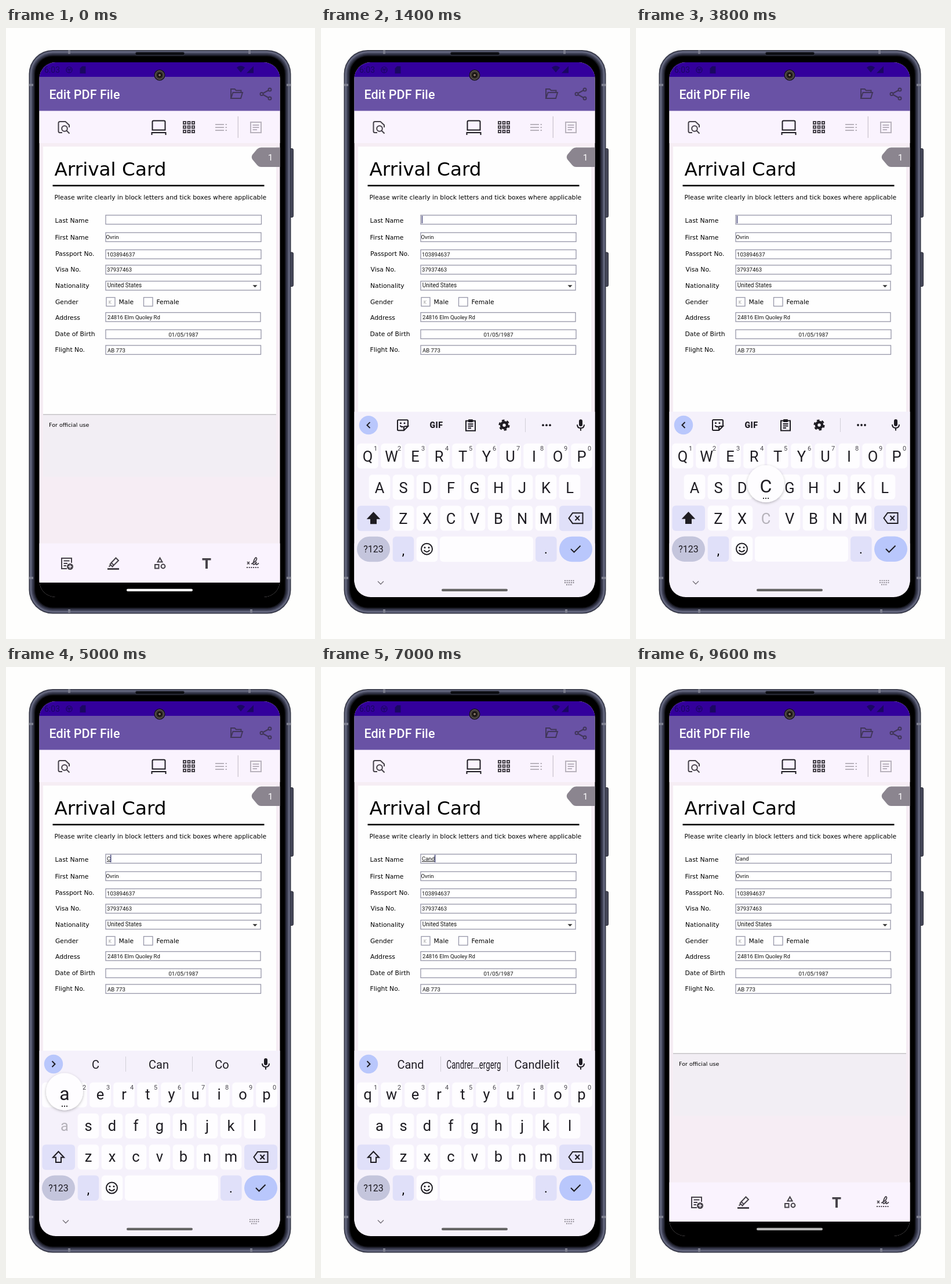
Write an HTML page that moves like this. It is 533 by 1051 pixels and loops after 9800 ms.

```html
<!DOCTYPE html>
<html lang="en">
<head>
<meta charset="utf-8">
<title>Edit PDF File</title>
<style>
  html, body { margin: 0; width: 100%; height: 100%; overflow: hidden; background: #fefefd; }
  svg { display: block; width: 533px; height: 1051px; }
  text { font-family: Roboto, sans-serif; white-space: pre; }
  .form { font-family: "DejaVu Sans", sans-serif; font-size: 10.8px; }
  .value { font-size: 9.6px; fill: #111; }
  .box { fill: #fff; stroke: #9696a8; stroke-width: 1.3; }
  .mid { text-anchor: middle; }
  .line { fill: none; stroke: currentColor; stroke-width: 2; }
</style>
</head>
<body>
<svg viewBox="0 0 533 1051">
  <defs>
    <clipPath id="screen"><rect x="57.5" y="59" width="415" height="920" rx="28"/></clipPath>
    <filter id="shadow" x="-30%" y="-30%" width="160%" height="160%">
      <feDropShadow dx="0" dy="1.5" stdDeviation="2" flood-opacity=".28"/>
    </filter>
  </defs>
  <g id="phone"></g>
  <g clip-path="url(#screen)">
    <g id="app"></g>
    <g id="entry">
      <text id="typed" class="value" y="333"></text>
      <rect id="caret" y="323" width="1.5" height="13" fill="#45477c"/>
    </g>
    <g id="keyboard"></g>
    <rect id="handle" x="208" y="964.8" width="114" height="4.2" rx="2.1"/>
  </g>
  <g id="camera">
    <circle cx="265" cy="81" r="9.5" fill="#17151a"/>
    <circle cx="265" cy="81" r="7.5" fill="#3d3733" stroke="#6d655f"/>
    <circle cx="265" cy="81" r="4.5" fill="#15110f"/>
    <circle cx="265" cy="81" r="2" fill="#806f64"/>
  </g>
</svg>
<script>
const LOOP = 9800, TICK = 200, CLOSE = 8600;
const INK = '#1e1c22';
const $ = id => document.getElementById(id);

const rect = (x, y, w, h, fill, rx = 0, extra = '') =>
  `<rect x="${x}" y="${y}" width="${w}" height="${h}" rx="${rx}" fill="${fill}" ${extra}/>`;
const text = (x, y, size, str, extra = '') =>
  `<text x="${x}" y="${y}" font-size="${size}" ${extra}>${str}</text>`;
const label = (x, y, str) => `<text class="form" x="${x}" y="${y}">${str}</text>`;
const value = (x, y, str, extra = '') => `<text class="value" x="${x}" y="${y}" ${extra}>${str}</text>`;
const box = (x, y, w, h) => `<rect class="box" x="${x}" y="${y}" width="${w}" height="${h}"/>`;
const path = (d, extra = 'class="line"') => `<path d="${d}" ${extra}/>`;
const solid = d => path(d, 'fill="currentColor"');
// Icons are drawn on a 24 unit grid centred on x, y.
const icon = (x, y, color, body, scale = 1) =>
  `<g transform="translate(${x} ${y}) scale(${scale}) translate(-12 -12)" color="${color}">${body}</g>`;
const dot = (x, y, r) => `<circle cx="${x}" cy="${y}" r="${r}" fill="currentColor"/>`;
const ring = (x, y, r, extra = '') => `<circle class="line" cx="${x}" cy="${y}" r="${r}" ${extra}/>`;
const range = n => [...Array(n).keys()];

function drawPhone() {
  const shell = (inset, fill) =>
    rect(39.5 + inset, 38 + inset, 452 - 2 * inset, 969.5 - 2 * inset, fill, 41 - inset);
  return rect(489, 207.5, 6.5, 118, '#484a5c', 2, 'stroke="#1e1f29"') +
    rect(489, 386, 6.5, 58.5, '#484a5c', 2, 'stroke="#1e1f29"') +
    shell(0, '#2a2c38') + shell(1, '#4d5065') + shell(2.5, '#6d7088') +
    shell(4, '#4d5065') + shell(6, '#323447') + shell(8.5, '#191a23') + shell(10.5, '#000') +
    [[107, 38.5], [418, 38.5], [107, 1000], [421, 1000]].map(([x, y]) => rect(x, y, 4, 6, '#7c7e8e')).join('') +
    [[40, 96], [40, 944], [484, 96], [484, 944]].map(([x, y]) => rect(x, y, 7, 4, '#7c7e8e')).join('') +
    rect(223, 41.5, 85, 5.5, '#0c0d12', 2.7, 'stroke="#3b3d4c"');
}

function drawBars() {
  const status = '#1a0862', dark = '#41365a', grey = '#b9b3bd';
  return rect(57, 59, 416, 25, '#33009c') + rect(57, 84, 416, 59, '#6952a5') +
    text(66, 77, 14, '6:03', `fill="${status}"`) +
    icon(109, 72, status, ring(12, 12, 9) + path('M4 12H20M12 12V20M7 6 12 12 17 6'), .58) +
    icon(132.5, 72, status, solid('M10 2H20V22H4V8Z'), .62) +
    icon(405, 71, status, solid('M12 21 .5 7Q12-2 23.5 7Z'), .62) +
    icon(421, 71.5, status, solid('M2 22 22 2V22Z'), .6) +
    text(74.5, 122, 21.6, 'Edit PDF File', 'fill="#fff" font-weight="500"') +
    icon(397, 113, dark, path('M3 20V4H9.5L12 6.5H20.5V10M3 20 6.5 10H23L20 20Z')) +
    icon(448, 113.5, dark, ring(19, 4.5, 2.5) + ring(5, 12, 2.5) + ring(19, 19.5, 2.5) + path('M7 11 17 5.5M7 13 17 18.5')) +
    rect(57, 142.5, 416, 55.5, '#faf3fe') +
    icon(100, 171, '#454148', path('M9 21H5Q2.5 21 2.5 18.5V4.5Q2.5 2 5 2H14.5L21 8V12') +
      ring(13, 14, 4.8) + path('M16.5 17.5 21.5 22.5')) +
    icon(263.5, 171, INK, path('M3 .5H21Q23 .5 23 2.5V16.5H1V2.5Q1 .5 3 .5ZM0 25V21H24V25')) +
    icon(315.5, 170.5, '#454148', range(9).map(i =>
      `<rect class="line" x="${2.5 + i % 3 * 7.5}" y="${2.5 + (i / 3 | 0) * 7.5}" width="4" height="4"/>`).join('')) +
    icon(371, 171, grey, path('M2 7H17M2 12H17M2 17H17M19.5 7H22M19.5 12H22M19.5 17H22')) +
    rect(399.7, 152, 1.2, 37, '#c9c3cc') +
    icon(431, 171, grey, path('M3 3H21V21H3ZM6.5 8H17.5M6.5 12H17.5M6.5 16H14'));
}

function drawPage() {
  const rows = [
    ['Last Name', 84.5, 335, 322, 268.5], ['First Name', 84.5, 363.5, 352, 268],
    ['Passport No.', 85, 391.5, 381.5, 268], ['Visa No.', 85.5, 419, 408, 268],
    ['Nationality', 85, 446.5, 435.5, 267], ['Gender', 85, 474.5],
    ['Address', 85, 501.5, 489.5, 267], ['Date of Birth', 84.5, 529.5, 519, 268],
    ['Flight No.', 84.5, 557, 546, 267.5]
  ];
  return rect(64, 204, 402, 461, '#fefefe') +
    rect(64, 665, 402, 107, '#f2eef4') + rect(64, 664, 402, 1.6, '#c9c7ca') +
    text(83.5, 254, 32.7, 'Arrival Card', 'style="font-family:\'DejaVu Sans\',sans-serif"') +
    rect(80.5, 269.8, 365, 2.6, '#000') +
    label(83.5, 295, 'Please write clearly in block letters and tick boxes where applicable') +
    rows.map(([name, x, y, top, w]) => label(x, y, name) + (top ? box(172, top, w, 15.5) : '')).join('') +
    value(172.5, 363, 'Ovrin') + value(174, 392.5, '103894637') + value(174, 419, '37937463') +
    value(174.7, 446, 'United States', 'style="font-size:10px"') +
    path('M425.5 442.2H433.5L429.5 446.2Z', 'fill="#333"') +
    box(173, 463.5, 15, 15) + box(237.5, 463.5, 15.5, 15) +
    path('M178 468.5V474.5M181.5 468.5 178.8 471.5 181.5 474.5', 'fill="none" stroke="#999" stroke-width=".9"') +
    label(194.5, 475, 'Male') + label(259.5, 475, 'Female') +
    value(175, 501, '24816 Elm Quoley Rd') + value(306, 530.5, '01/05/1987', 'text-anchor="middle"') +
    value(175, 557.5, 'AB 773') +
    `<text class="form" x="74" y="685.5" style="font-size:9.55px">For official use</text>` +
    path('M473 205.5H440Q436 205.5 433 208.5L425 218Q422.5 222 425 226L433 235.5Q436 239 440 239H473Z', 'fill="#8b858f"') +
    text(456, 228, 15.5, '1', 'class="mid" fill="#fff"');
}

function drawTools() {
  const ink = '#47434a';
  return rect(57, 886.5, 416, 67.5, '#faf3fe') + rect(57, 954, 416, 25, '#000') +
    icon(105, 921, ink, path('M12 21H3V3H20V11M6.5 7.5H16.5M6.5 12H13M6.5 16H11') + dot(17.5, 17.5, 5.5) +
      path('M17.5 14.5V20.5M14.5 17.5H20.5', 'stroke="#faf3fe" stroke-width="1.6"')) +
    icon(185, 921, ink, path('M8.5 11 16.5 2.5 21 7 13 15ZM8.5 11 6.5 13.5 10.5 17.5 13 15M7.5 15 4.5 17.5') + rect(2, 20, 20, 3, 'currentColor')) +
    icon(265.5, 921, ink, path('M12 2.5 16 9.5H8ZM3.5 14H10V20.5H3.5Z') + ring(17.5, 17, 3.4)) +
    icon(346, 921, ink, solid('M4.5 3H19.5V6.5H14V21H10V6.5H4.5Z')) +
    icon(426, 920, ink, path('M2 10 6 14.5M6 10 2 14.5', 'class="line" style="stroke-width:1.5"') +
      path('M9 14Q19 9 18.5 4.5 17 .5 14 7 10.5 16 14 15 16 14 18 10.5 16 16 19 15L22 12.5', 'class="line" style="stroke-width:1.8"') +
      path('M1 20H23', 'class="line" stroke-dasharray="2 1.7"'));
}

const ROWS = [
  { keys: 'qwertyuiop', x: 80.5, y: 736 },
  { keys: 'asdfghjkl', x: 101, y: 789.5 },
  { keys: 'zxcvbnm', x: 142, y: 843 }
];
const DIGITS = '1234567890', PITCH = 41;
const KEY = '#fefdff', MOD = '#e0e0f9', ACCENT = '#b9c7fc';

const mic = icon(448, 683, INK, rect(9, 2, 6, 12, 'currentColor', 3) + path('M6 11Q6 17 12 17T18 11M12 17V21.5'));

function drawToolRow() {
  return icon(82, 683, INK, path('M14.5 7 9.5 12 14.5 17')) +
    icon(141, 683, INK, path('M21 14V4.5Q21 3 19.5 3H4.5Q3 3 3 4.5V19.5Q3 21 4.5 21H14L21 14H16Q14 14 14 16V21M7.5 12.5Q9 16 13 14.5') + dot(8.5, 8.5, 1.5) + dot(15, 8.5, 1.5)) +
    text(199, 688, 14, 'GIF', `class="mid" font-weight="900" letter-spacing=".6" fill="${INK}"`) +
    icon(258, 683, INK, path('M4 4.5H20V21.5H4ZM7.5 10H16.5M7.5 13.5H16.5M7.5 17H13') + rect(8, 2, 8, 5, 'currentColor', 1)) +
    icon(316, 683, INK, ring(12, 12, 5, 'style="stroke-width:4.5"') +
      ring(12, 12, 8.3, 'style="stroke-width:2.6" stroke-dasharray="4.6 4.09"')) +
    rect(352, 671, 1, 24, '#d2cfd8') +
    icon(389, 683, INK, dot(6, 12, 1.9) + dot(12, 12, 1.9) + dot(18, 12, 1.9)) + mic;
}

function drawSuggestions(words) {
  return icon(82, 683, INK, path('M9.5 7 14.5 12 9.5 17')) +
    rect(206, 670, 1, 26, '#d2cfd8') + rect(321, 670, 1, 26, '#d2cfd8') +
    words.map((word, i) => `<g transform="translate(${[154.5, 263.5, 372.5][i]} 691)">` +
      text(0, 0, 20, word, `class="mid word" fill="${INK}"`) + '</g>').join('') + mic;
}

function drawKeyboard({ press, words, closing }) {
  const caps = !words;
  let bubble = '';
  const letters = ROWS.map(row => [...row.keys].map((key, i) => {
    const x = row.x + i * PITCH, glyph = caps ? key.toUpperCase() : key, down = glyph === press;
    if (down) bubble = `<circle cx="${x}" cy="${row.y - 59}" r="32" fill="${KEY}" filter="url(#shadow)"/>` +
      text(x, row.y - 44.5, 32, glyph, `class="mid" fill="${INK}"`) +
      [-4, 0, 4].map(d => `<circle cx="${x + d}" cy="${row.y - 34}" r="1.1"/>`).join('');
    const digit = row === ROWS[0] && !closing
      ? text(x + 13.5, row.y - 9, 11, DIGITS[i], 'class="mid" fill="#49464e"') : '';
    return (down ? '' : rect(x - 18.3, row.y - 21.5, 36.6, 43, KEY, 6)) + digit +
      text(x, row.y + (caps ? 10 : 8), 25.5, glyph, `class="mid" fill="${down ? '#b4b1b9' : INK}"`);
  }).join('')).join('');

  const topRow = closing
    ? range(10).map(i => text(ROWS[0].x + i * PITCH, 692, 24, DIGITS[i], `class="mid" fill="${INK}"`)).join('')
    : `<circle cx="82" cy="683" r="16.2" fill="${ACCENT}"/>` + (caps ? drawToolRow() : drawSuggestions(words));

  return rect(57, 660, 416, 400, '#f5f1fb') + topRow + letters +
    rect(62.5, 821.5, 56.5, 43.5, MOD, 6) + rect(411, 821.5, 57, 43.5, MOD, 6) +
    icon(90.5, 843, INK, path('M12 2.5 2.5 12.5H7.5V21H16.5V12.5H21.5Z',
      `class="line" style="fill:${caps ? INK : 'none'}"`)) +
    icon(439, 843, INK, path('M7 3H24.5V21H7L.5 12ZM11.5 8 19 16M19 8 11.5 16')) +
    rect(62, 874.5, 57, 43.5, '#c4c5dc', 21.7) + text(90.5, 902, 16, '?123', `class="mid" fill="${INK}"`) +
    rect(123.7, 874.5, 36.6, 43.5, MOD, 6) + text(142, 906, 22, ',', 'class="mid"') +
    rect(164.7, 874.5, 36.6, 43.5, KEY, 6) +
    icon(182.5, 896, INK, ring(12, 12, 9.5) + dot(8.5, 9.5, 1.5) + dot(15.5, 9.5, 1.5) + path('M7 14Q12 20 17 14')) +
    rect(205, 874.5, 161, 43.5, KEY, 6) +
    rect(370, 874.5, 36.6, 43.5, MOD, 6) + text(388, 904, 22, '.', 'class="mid"') +
    rect(411, 874.5, 57, 43.5, ACCENT, 21.7) +
    icon(439, 896, INK, path('M4 12 9.5 17.5 20.5 6.5')) +
    path('M98 951.5 103 956.5 108 951.5', 'fill="none" stroke="#77737c" stroke-width="1.4"') +
    path('M420 950.5H437M420 954H437M423 957.5H434', 'fill="none" stroke="#77737c" stroke-width="1.6" stroke-dasharray="2 1.6"') +
    bubble;
}

// Each step holds until the next one begins.
const STEPS = [
  { at: 0, text: '' },
  { at: 3600, text: '', press: 'C' },
  { at: 4000, text: 'C', words: ['C', 'Can', 'Co'] },
  { at: 4800, text: 'C', words: ['C', 'Can', 'Co'], press: 'a' },
  { at: 5200, text: 'Ca', words: ['Ca', 'Can', 'Car'] },
  { at: 5600, text: 'Ca', words: ['Ca', 'Can', 'Car'], press: 'n' },
  { at: 6000, text: 'Can', words: ['Can', 'Cannot', 'Candy'] },
  { at: 6600, text: 'Can', words: ['Can', 'Cannot', 'Candy'], press: 'd' },
  { at: 6800, text: 'Cand', words: ['Cand', 'Candrer...ergerg', 'Candlelit'] },
  { at: CLOSE, text: 'Cand', words: [], closing: true }
];

// Suggestions too long for their slot are condensed.
function fitWords() {
  for (const word of document.querySelectorAll('.word')) {
    const scale = Math.min(1, 94 / word.getComputedTextLength());
    word.setAttribute('transform', `scale(${scale} 1)`);
  }
}

function handleColor(t) {
  if (t < 1000) return '#fff';
  const grey = t >= 9000 ? 62 + (t - 9000) * .2 : Math.max(101, 236 - (t - 1000) * .34);
  return `rgb(${grey},${grey},${grey})`;
}

let shownStep;
function render(t) {
  const step = STEPS.findLast(s => s.at <= t);
  const keyboard = $('keyboard'), typed = $('typed'), focused = t >= 600 && t < CLOSE;
  const visible = t >= 1000 && t <= 9000;
  keyboard.style.display = visible ? '' : 'none';
  if (step !== shownStep) {
    shownStep = step;
    keyboard.innerHTML = drawKeyboard(step);
    typed.textContent = step.text;
  }
  if (visible) fitWords();

  const leave = Math.max(0, (t - CLOSE) / 400);
  const shift = leave ? 202 * leave : 21.5 * Math.exp(-(t - 1000) / 80);
  keyboard.setAttribute('transform', `translate(0 ${shift})`);
  keyboard.setAttribute('opacity', 1 - .91 * Math.min(1, leave));

  typed.setAttribute('x', focused ? 174 : 172.5);
  typed.setAttribute('text-decoration', focused ? 'underline' : 'none');
  $('caret').setAttribute('x', 173.7 + (step.text ? typed.getComputedTextLength() : 0));
  $('caret').style.display = focused ? '' : 'none';
  $('handle').setAttribute('fill', handleColor(t));
}

$('phone').innerHTML = drawPhone();
$('app').innerHTML = rect(57, 59, 416, 920, '#f6edf4') + drawBars() + drawPage() + drawTools();

function frame() {
  render(Math.floor(performance.now() % LOOP / TICK) * TICK);
  requestAnimationFrame(frame);
}
frame();
</script>
</body>
</html>
```
